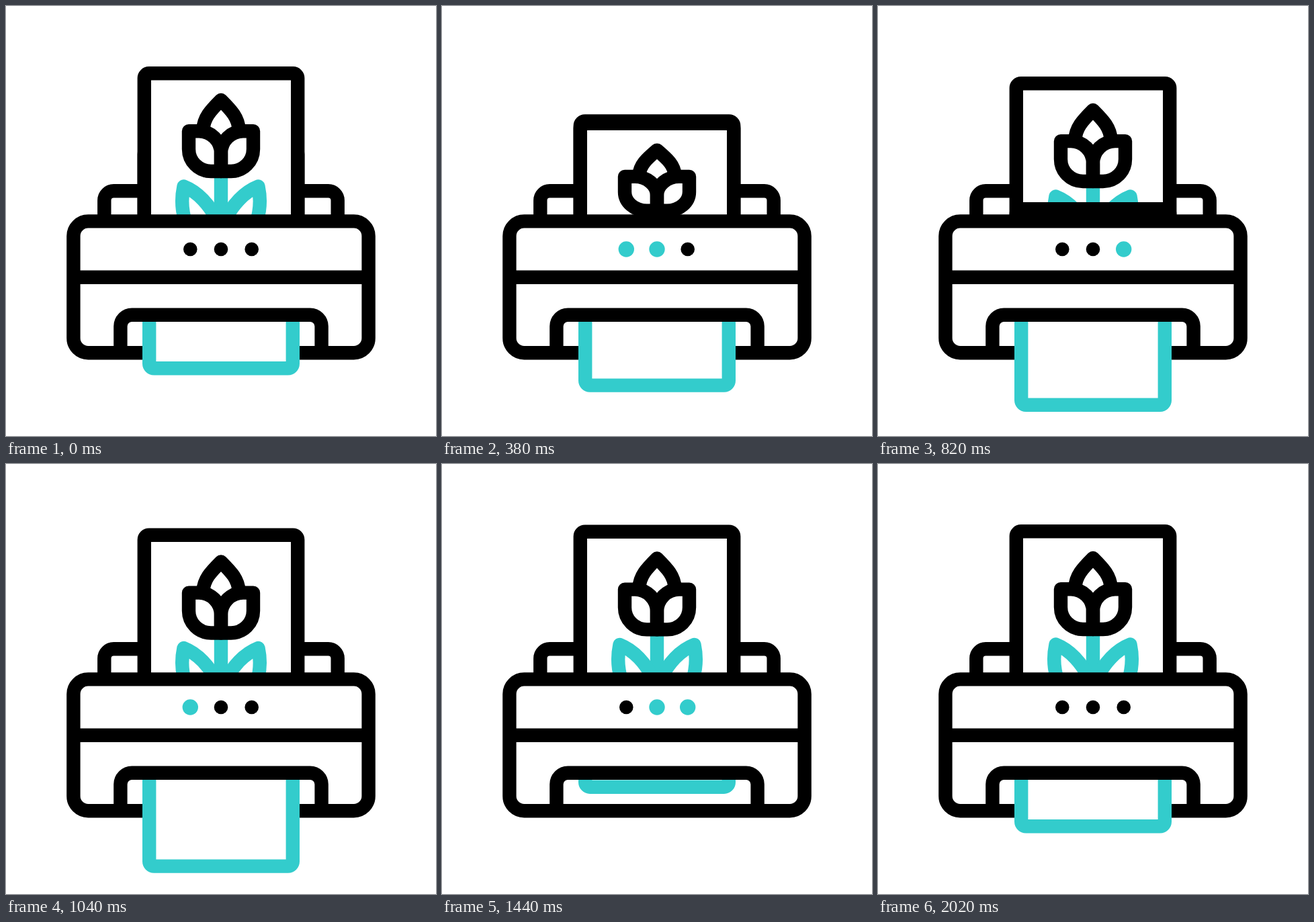
An HTML page that plays this animation: 640x640 px, repeating every 2220 ms.

```html
<!DOCTYPE html>
<html lang="en">
<head>
<meta charset="utf-8">
<title>Printer</title>
<style>
html, body { margin: 0; width: 100%; height: 100%; overflow: hidden; background: #fff; }
svg { display: block; width: 100vw; height: 100vh; }
path, rect { stroke: #000; stroke-width: 20.4; fill: none; stroke-linejoin: round; vector-effect: non-scaling-stroke; }
.paper { fill: #fff; }
.teal { stroke: #33cccc; }
</style>
</head>
<body>
<svg viewBox="0 0 640 640">
  <defs>
    <clipPath id="above"><rect width="640" height="321"/></clipPath>
    <clipPath id="below"><rect y="460" width="640" height="180"/></clipPath>
    <path id="sheet" class="paper" d="M205.8 600V107.3a7 7 0 0 1 7-7H427.2a7 7 0 0 1 7 7V600"/>
    <path id="leaf" class="teal" d="M268 324C261 304 261 285 264.5 268.5C284 276 304 295 317 325"/>
    <path id="petal" d="M272 186.2H287a33 33 0 0 1 33 33V246H305a33 33 0 0 1-33-33Z"/>
    <g id="flower">
      <path class="teal" d="M320 246V345"/>
      <use href="#leaf"/>
      <use href="#leaf" transform="matrix(-1 0 0 1 640 0)"/>
      <path d="M293.3 184C294.5 166 304 156 320 140C336 156 345.5 166 346.7 184"/>
      <use href="#petal"/>
      <use href="#petal" transform="matrix(-1 0 0 1 640 0)"/>
    </g>
    <path id="tray" d="M146.3 320V289.3a14 14 0 0 1 14-14H206"/>
  </defs>

  <use href="#tray"/>
  <use href="#tray" transform="matrix(-1 0 0 1 640 0)"/>
  <g clip-path="url(#above)">
    <g id="next"><use href="#sheet"/><use href="#flower"/></g>
    <g id="feed"><use href="#sheet"/><use id="feedFlower" href="#flower"/></g>
  </g>

  <rect class="paper" x="100.4" y="320.4" width="439.2" height="195.8" rx="22"/>
  <path d="M100 403.7H540"/>
  <g id="dots"></g>
  <g clip-path="url(#below)">
    <path id="output" class="paper teal" d="M213.2 200V532.3a7 7 0 0 0 7 7H419.8a7 7 0 0 0 7-7V200"/>
  </g>
  <path d="M170.4 516V476.8a17 17 0 0 1 17-17H452.6a17 17 0 0 1 17 17V516"/>
</svg>
<script>
const LOOP = 2220, STEP = 20, START = 200;
const $ = id => document.getElementById(id);

// Smooth curve through [time, value] keys that never overshoots them.
function track(keys) {
  const slope = i => (keys[i + 1][1] - keys[i][1]) / (keys[i + 1][0] - keys[i][0]);
  const tangent = i => {
    if (i === 0 || i === keys.length - 1) return 0;
    const a = slope(i - 1), b = slope(i);
    return a * b > 0 ? 2 * a * b / (a + b) : 0;
  };
  return t => {
    if (t <= keys[0][0]) return keys[0][1];
    const i = keys.findIndex(k => k[0] > t) - 1;
    if (i < 0) return keys[keys.length - 1][1];
    const [t0, v0] = keys[i], [t1, v1] = keys[i + 1];
    const d = t1 - t0, u = (t - t0) / d, w = 1 - u;
    return w * w * ((1 + 2 * u) * v0 + u * d * tangent(i)) +
           u * u * ((3 - 2 * u) * v1 - w * d * tangent(i + 1));
  };
}

const feedDrop = track([[START, 0], [290, 45], [380, 74.6], [580, 86], [620, 96.3],
  [680, 140], [740, 178], [820, 202], [1000, 216], [1040, 222], [1100, 240]]);

// Three pushes out, a pull back in, then a soft overshoot to rest.
const outputDrop = track([[START, 0], [300, 17], [380, 25.3], [580, 29.5], [620, 32.3],
  [680, 42], [740, 49.5], [820, 54.5], [1000, 58], [1040, 59.3], [1100, 71],
  [1160, 78], [1290, 88.5], [1440, -58.6], [1460, -60], [1580, -25], [1740, 13],
  [1820, 8], [1900, 3], [2020, 0]]);

const nextDrop = t => 113.4 * Math.max(0, 1 - Math.max(0, t - 220) / 1801) ** 5;

const dots = [274.3, 320, 365.7].map(x => {
  const dot = document.createElementNS("http://www.w3.org/2000/svg", "circle");
  dot.setAttribute("cx", x);
  dot.setAttribute("cy", 362);
  $("dots").append(dot);
  return dot;
});

function dotLit(t, i) {
  const age = t - 220 - 100 * i;
  return age >= 0 && age < 1600 && age % 800 < 410;
}

const shift = (id, y) => $(id).setAttribute("transform", `translate(0 ${y})`);

function draw(t) {
  const drop = feedDrop(t), squash = 1 - 0.002 * drop;
  shift("next", nextDrop(t));
  shift("feed", drop);
  $("feedFlower").setAttribute("transform", `translate(0 ${140 * (1 - squash)}) scale(1 ${squash})`);
  shift("output", outputDrop(t));
  dots.forEach((dot, i) => {
    const lit = dotLit(t, i);
    dot.setAttribute("r", lit ? 11.7 : 10.3);
    dot.setAttribute("fill", lit ? "#33cccc" : "#000");
  });
}

let origin;
function tick(now) {
  origin ??= now;
  const t = (now - origin) % LOOP;
  draw(t - t % STEP);
  requestAnimationFrame(tick);
}
draw(0);
requestAnimationFrame(tick);
</script>
</body>
</html>
```
